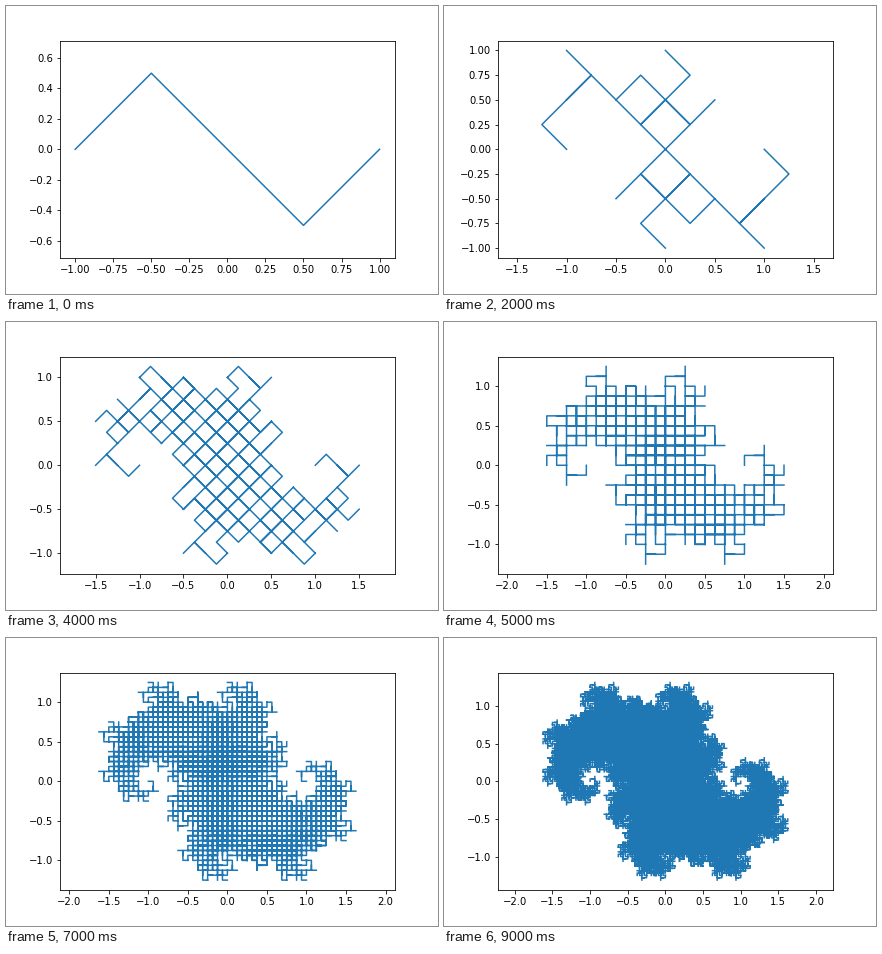
A matplotlib script for the animation above (10 s loop, 432 px wide and 288 px high).

```python
import numpy as np
import matplotlib.pyplot as plt
from matplotlib.animation import FuncAnimation

LEVELS = 10
TURN = (1 + 1j) / 2
SHIFT = (-1 + 1j) / 2
SEED = np.array([[-1, -0.5 + 0.5j, 0, 0.5 - 0.5j, 1]])


def refine(pieces):
    """Replace the figure by three copies of itself, shrunk by sqrt(2)."""
    side = TURN * pieces + SHIFT
    middle = np.conj(TURN) * pieces
    return np.concatenate([side, middle, -side])


def polyline(level):
    pieces = SEED
    for _ in range(level):
        pieces = refine(pieces)
    gap = np.full((len(pieces), 1), complex(np.nan, np.nan))
    return np.hstack([pieces, gap]).ravel()


curves = [polyline(n) for n in range(LEVELS)]

fig, ax = plt.subplots(figsize=(6, 4), dpi=72)
fig.subplots_adjust(left=0.125, right=0.9, bottom=0.125, top=0.88)


def draw(level):
    ax.clear()
    z = curves[level]
    ax.plot(z.real, z.imag, color="C0", lw=1.5)
    ax.axis("equal")


anim = FuncAnimation(fig, draw, frames=LEVELS, init_func=lambda: draw(0),
                     interval=1000, repeat=True, repeat_delay=0)
plt.show()
```
